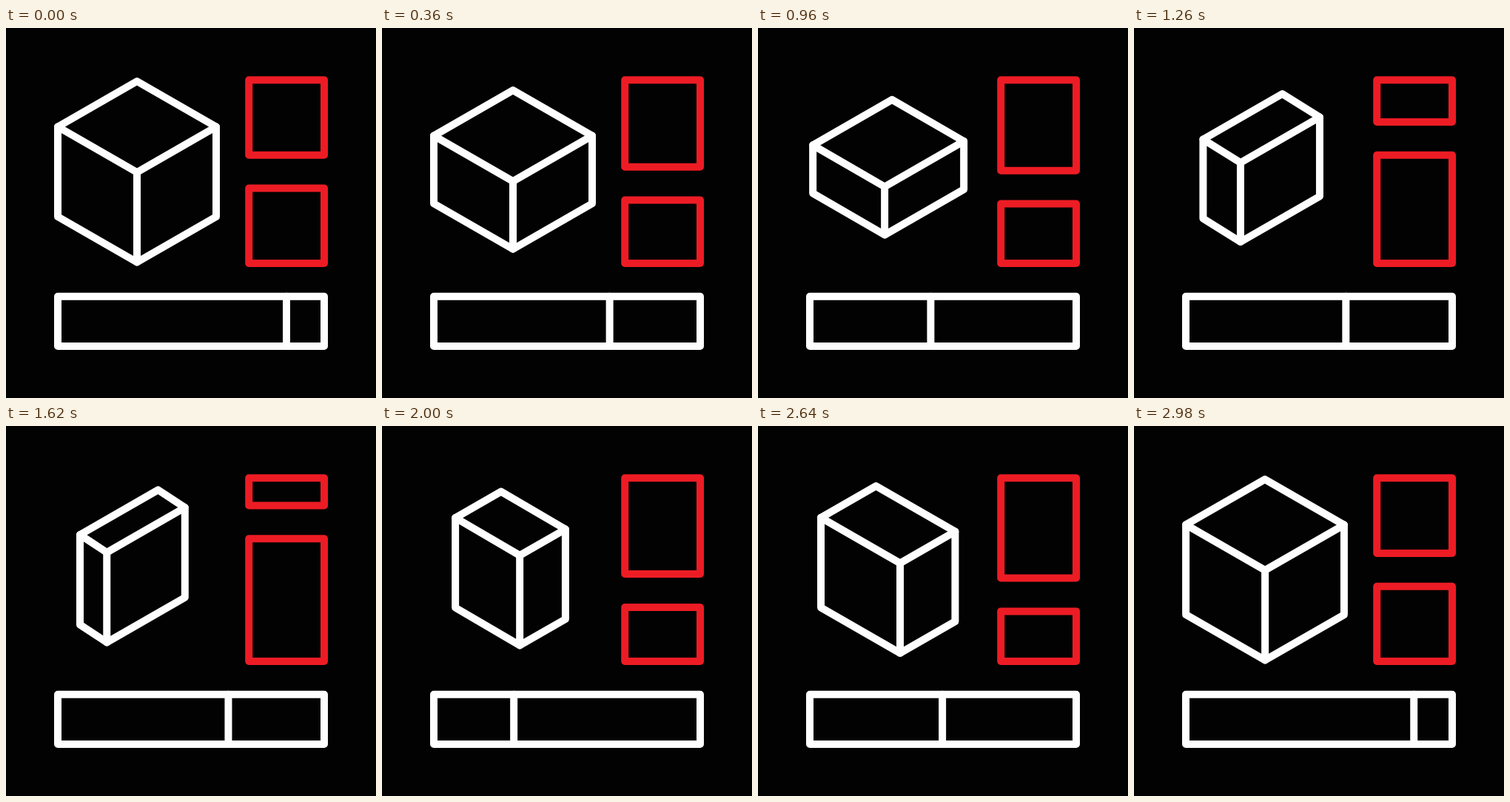
These frames come from a looping animation (500x500 px, 3 s). An HTML page with a canvas:

```html
<!DOCTYPE html>
<html lang="en">
<head>
<meta charset="utf-8">
<title>Box sliders</title>
<style>
  html, body { margin: 0; width: 100%; height: 100%; overflow: hidden; background: #020202; }
  canvas { display: block; }
</style>
</head>
<body>
<canvas id="stage" width="500" height="500"></canvas>
<script>
const ctx = document.getElementById('stage').getContext('2d');
const LOOP = 3000, MOVE = 720;
const BLACK = '#020202', WHITE = '#fefefe', RED = '#ed1c24';
const GAP = 44.9;

// Resting cube: left corner, edge vectors (left and right) and height
const home = {
  start: 20,
  x: 70, y: 133.5,
  leftX: 107, leftY: 61.5,
  rightX: 107, rightY: -61.5,
  height: 121.5,
  split: 171.7, bar: 379
};

// Each pose shrinks one dimension of the cube
const poses = [
  home,
  { ...home, start: 775, y: 160, height: 56, split: 206.8, bar: 222 },
  { ...home, start: 1543, x: 100, y: 147.8, leftX: 34.6, leftY: 23, split: 104.4, bar: 304.5 },
  { ...home, start: 2290, x: 98.8, y: 115, rightX: 44.5, rightY: -25.5, split: 236.5, bar: 130 }
];

// Cubic Bezier (0.42, 0, 0.58, 1), solved by bisection
function ease(x) {
  if (x <= 0) return 0;
  if (x >= 1) return 1;
  let lo = 0, hi = 1;
  for (let i = 0; i < 30; i++) {
    const u = (lo + hi) / 2, v = 1 - u;
    const at = 3 * v * v * u * 0.42 + 3 * v * u * u * 0.58 + u * u * u;
    if (at < x) lo = u; else hi = u;
  }
  return lo * lo * (3 - 2 * lo);
}

function poseAt(t) {
  const i = Math.max(0, poses.filter(p => p.start <= t).length - 1);
  const from = poses[i], to = poses[(i + 1) % poses.length];
  const k = ease((t - from.start) / MOVE);
  const pose = {};
  for (const key in from) pose[key] = from[key] + (to[key] - from[key]) * k;
  return pose;
}

function line(points, closed) {
  ctx.beginPath();
  points.forEach(([x, y]) => ctx.lineTo(x, y));
  if (closed) ctx.closePath();
  ctx.stroke();
}

function box(x1, y1, x2, y2) {
  line([[x1, y1], [x2, y1], [x2, y2], [x1, y2]], true);
}

function cube({ x, y, leftX, leftY, rightX, rightY, height }) {
  const left = [x, y];
  const back = [x + rightX, y + rightY];
  const front = [x + leftX, y + leftY];
  const right = [front[0] + rightX, front[1] + rightY];
  const down = ([px, py]) => [px, py + height];
  line([left, back, right, front], true);
  line([left, down(left), down(front), down(right), right]);
  line([front, down(front)]);
}

function draw(t) {
  const pose = poseAt(t);
  ctx.fillStyle = BLACK;
  ctx.fillRect(0, 0, 500, 500);
  ctx.lineWidth = 10;
  ctx.lineJoin = ctx.lineCap = 'round';

  ctx.strokeStyle = WHITE;
  cube(pose);
  box(70, 362.7, 430, 430);
  line([[pose.bar, 362.7], [pose.bar, 430]]);

  ctx.strokeStyle = RED;
  box(328.2, 70.2, 430, pose.split);
  box(328.2, pose.split + GAP, 430, 318);
}

const begin = performance.now();
function tick() {
  draw((performance.now() - begin) % LOOP);
  requestAnimationFrame(tick);
}
tick();
</script>
</body>
</html>
```
